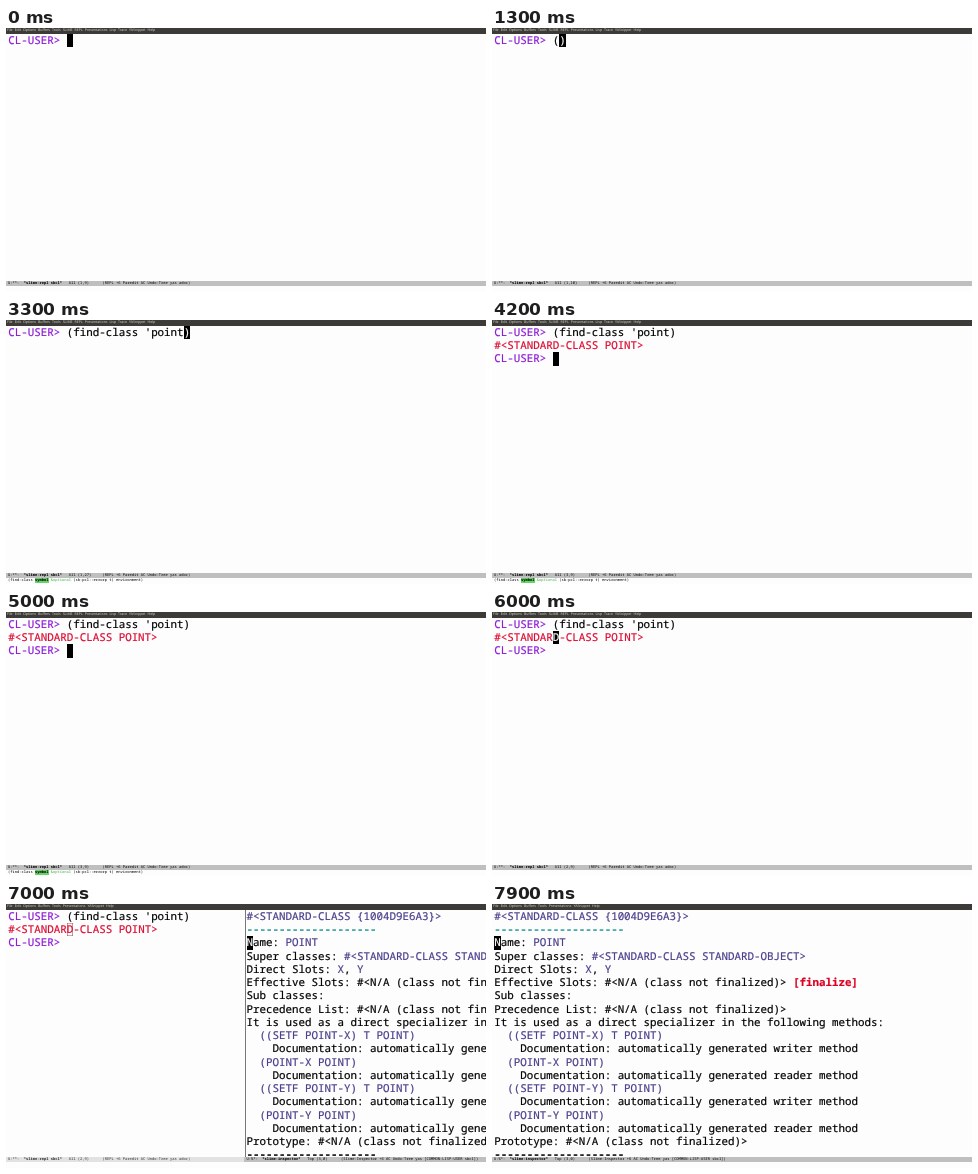
An HTML page that plays this animation: 480 px wide and 264 px high, repeating every 8 s.

```html
<!DOCTYPE html>
<html lang="en">
<head>
<meta charset="utf-8">
<title>Inspecting a class in the REPL</title>
<style>
html, body { margin: 0; width: 100%; height: 100%; overflow: hidden; background: #fdfdfd; }
#stage { position: relative; width: 480px; height: 264px; overflow: hidden; color: #000;
  text-rendering: geometricPrecision; font-family: "Noto Sans Mono", "DejaVu Sans Mono", monospace; }
#stage div { position: absolute; overflow: hidden; white-space: pre; box-sizing: border-box; }
#stage .menu { left: 0; top: 0; width: 480px; height: 5.6px; padding-left: 1px; background: #3c3b37;
  color: #dfdbd2; display: flex; gap: 2px; font: 3.55px/5.6px "Open Sans", "Noto Sans", sans-serif; }
.pane { top: 6px; height: 246.5px; padding-left: 2.2px; font-size: 10.84px; line-height: 13.24px;
  -webkit-text-stroke: .2px; }
.mode, .echo { padding-left: 2px; font-size: 3.75px; line-height: 5.6px; }
.mode { top: 252.5px; height: 5.5px; background: #bfbfbf; }
.mode.idle { background: #e2e2e2; color: #333; }
.echo { left: 0; top: 258px; width: 480px; height: 6px; }
.divider { top: 6px; height: 246.5px; background: #777; }
.cursor { display: inline-block; height: 13.24px; vertical-align: top; background: #000; color: #fff; }
.hollow { display: inline-block; height: 13.24px; vertical-align: top; color: #dc0a32;
  box-shadow: inset 0 0 0 .6px #a55; }
.prompt { color: #8c1ad6; }
.result { color: #dc0a32; }
.value { color: #483d8b; }
.rule { color: #2a9a9a; font-weight: bold; }
.action { color: #dc0020; font-weight: bold; }
.arg { background: #66d466; font-weight: bold; }
.key { color: #4caf4c; }
</style>
</head>
<body>
<div id="stage"></div>
<script>
const LOOP = 8000;
const RESULT = 3700, UP = 5200, INSPECT = 6500, MAXIMIZE = 7400;
const ARGLIST = 2700;
const input = "(find-class 'point";
const keyTimes = [1000, 1400, 1500, 1600, 1700, 1800, 1900, 2000, 2100, 2200, 2400,
  2500, 2700, 2800, 2900, 3000, 3100, 3200];

const esc = s => s.replace(/&/g, "&amp;").replace(/</g, "&lt;");
const span = (cls, s) => `<span class="${cls}">${esc(s)}</span>`;
const value = s => span("value", s);
const box = (cls, x, w, html) => `<div class="${cls}" style="left:${x}px;width:${w}px">${html}</div>`;

const menu = names => `<div class="menu">${names.split(" ").map(n => `<span>${n}</span>`).join("")}</div>`;
const replMenu = menu("File Edit Options Buffers Tools SLIME REPL Presentations Lisp Trace YASnippet Help");
const inspectorMenu = menu("File Edit Options Buffers Tools Presentations YASnippet Help");

const echo = `<div class="echo">(find-class ${span("arg", "symbol")} ${span("key", "&optional")}` +
  ` (sb-pcl::errorp t) environment)</div>`;

const modeLine = (flags, buffer, pos, modes) =>
  `${flags}  <b>${buffer}</b>   ${pos.padEnd(15)}(${modes})`;

const slot = "    Documentation: automatically generated ";
const unknown = "#<N/A (class not finalized)>";
const dashes = "-".repeat(20);
const inspectorText = [
  value("#<STANDARD-CLASS {1004D9E6A3}>"),
  span("rule", dashes),
  span("cursor", "N") + "ame: " + value("POINT"),
  "Super classes: " + value("#<STANDARD-CLASS STANDARD-OBJECT>"),
  "Direct Slots: " + value("X") + ", " + value("Y"),
  "Effective Slots: " + esc(unknown) + " " + span("action", "[finalize]"),
  "Sub classes:",
  "Precedence List: " + esc(unknown),
  "It is used as a direct specializer in the following methods:",
  ...["X", "Y"].flatMap(s => [
    value(`  ((SETF POINT-${s}) T POINT)`), slot + "writer method",
    value(`  (POINT-${s} POINT)`), slot + "reader method"]),
  "Prototype: " + esc(unknown),
  `<b>${dashes}</b>`
].join("\n");

function inspector(x, w) {
  return box("pane", x, w, inspectorText) +
    box("mode", x, w, modeLine("U:%*-", "*slime-inspector*", "Top (3,0)",
      "Slime-Inspector +6 AC Undo-Tree yas [COMMON-LISP-USER sbcl]"));
}

function repl(t, w) {
  const prompt = span("prompt", "CL-USER>") + " ";
  const idle = t >= INSPECT;
  let text, pos;
  if (t < RESULT) {
    const count = keyTimes.filter(k => k <= t).length;
    text = prompt + input.slice(0, count) + span("cursor", count ? ")" : " ");
    pos = `1,${9 + count}`;
  } else {
    const up = t >= UP;
    const result = up
      ? span("result", "#<STANDAR") + span(idle ? "hollow" : "cursor", "D") + span("result", "-CLASS POINT>")
      : span("result", "#<STANDARD-CLASS POINT>");
    text = `${prompt}${input})\n${result}\n${prompt}${up ? "" : span("cursor", " ")}`;
    pos = up ? "2,9" : "3,9";
  }
  return box("pane", 0, w, text) +
    box(idle ? "mode idle" : "mode", 0, w, modeLine("U:**-", "*slime-repl sbcl*", `All (${pos})`,
      "REPL +6 Paredit AC Undo-Tree yas adoc"));
}

function scene(t) {
  if (t >= MAXIMIZE) return inspectorMenu + inspector(0, 480);
  if (t >= INSPECT) return inspectorMenu + repl(t, 238.5) + inspector(238.4, 241.6) + box("divider", 238.5, 0.8, "");
  return replMenu + repl(t, 480) + (t >= ARGLIST && t < UP ? echo : "");
}

const stage = document.getElementById("stage");
const start = performance.now();
let shown = "";
function draw() {
  const html = scene((performance.now() - start) % LOOP);
  if (html !== shown) stage.innerHTML = shown = html;
  requestAnimationFrame(draw);
}
draw();
</script>
</body>
</html>
```
